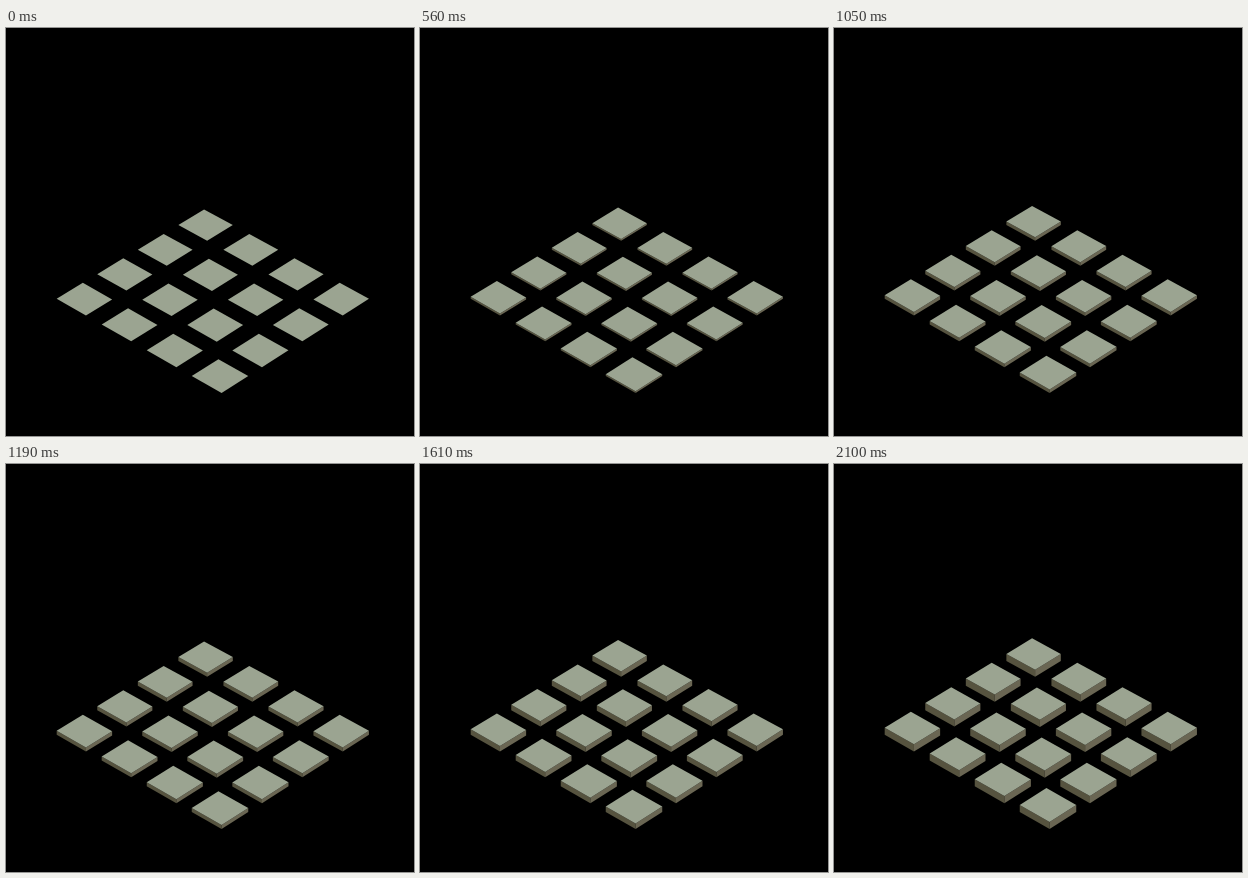
An HTML page with a canvas that plays this animation: 408 by 408 pixels, repeating every 2170 ms.

```html
<!DOCTYPE html>
<html lang="en">
<head>
<meta charset="utf-8">
<title>Rising tiles</title>
<style>
html, body { margin: 0; width: 100%; height: 100%; overflow: hidden; background: #000; }
canvas { display: block; width: 408px; height: 408px; }
</style>
</head>
<body>
<canvas id="stage" width="408" height="408"></canvas>
<script>
const ctx = document.getElementById('stage').getContext('2d');
const STEP = 70, STEPS = 31, MAX_HEIGHT = 7.1;
const TOP = '#9ba491', LEFT = '#56533f', RIGHT = '#6a6653';

// Ground plane to screen; the i * j term adds slight perspective.
function project(i, j) {
  return [199.6 + 45.2 * i - 40.4 * j, 197.1 + 24.67 * (i + j) + 0.33 * i * j];
}

const lift = ([x, y], h) => [x, y - h];

function fill(color, points) {
  ctx.fillStyle = color;
  ctx.beginPath();
  points.forEach(p => ctx.lineTo(...p));
  ctx.fill();
}

function drawTile(i, j, h) {
  const a = 0.318 + 0.002 * (i + j);
  const back = project(i - a, j - a), right = project(i + a, j - a);
  const front = project(i + a, j + a), left = project(i - a, j + a);
  if (h > 0) {
    fill(LEFT, [left, front, lift(front, h), lift(left, h)]);
    fill(RIGHT, [front, right, lift(right, h), lift(front, h)]);
  }
  fill(TOP, [back, right, front, left].map(p => lift(p, h)));
}

function draw(now) {
  const step = Math.floor(now / STEP) % STEPS;
  const height = MAX_HEIGHT * step / (STEPS - 1);
  ctx.fillStyle = '#000';
  ctx.fillRect(0, 0, 408, 408);
  for (let i = 0; i < 4; i++)
    for (let j = 0; j < 4; j++) drawTile(i, j, height);
}

const start = performance.now();
function tick() {
  draw(performance.now() - start);
  requestAnimationFrame(tick);
}
tick();
</script>
</body>
</html>
```
